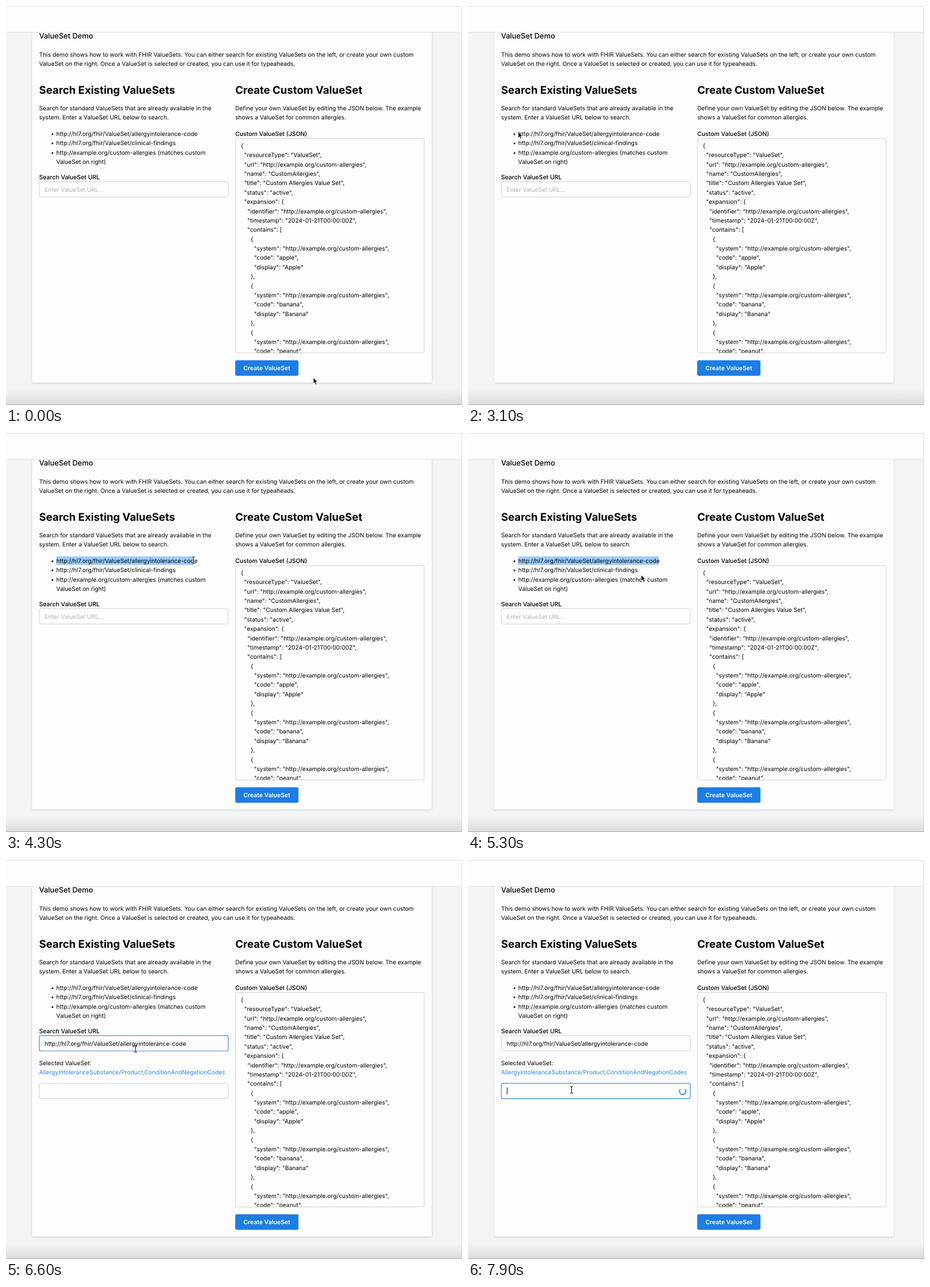
Animation, 799 px wide and 700 px high, one loop 8 s. Source, as an HTML page:

```html
<!DOCTYPE html>
<html lang="en">
<head>
<meta charset="utf-8">
<title>ValueSet Demo</title>
<style>
  html, body { margin: 0; width: 100%; height: 100%; overflow: hidden; background: #f2f4f6; }
  svg { display: block; }
  text { font: 10.3px Inter, sans-serif; fill: #000; text-rendering: geometricPrecision; }
  .title { font-size: 12.95px; font-weight: 500; }
  .heading { font-size: 18.7px; font-weight: 700; }
  .label { font-size: 10.56px; font-weight: 500; }
  .button { font-size: 10.56px; font-weight: 600; fill: #fff; text-anchor: middle; }
  .hint { fill: #adb3ba; }
  .link { fill: #2f86dc; }
  .field { fill: #fdfdfd; stroke: #cdd2d7; }
  .field.focused { stroke: #3a8fe6; stroke-width: 1.2; }
  .caret { stroke: #111; }
</style>
</head>
<body>
<svg id="stage" width="799" height="700" viewBox="0 0 799 700">
  <defs>
    <linearGradient id="fade" x2="0" y2="1">
      <stop offset="0" stop-color="#888" stop-opacity="0"/>
      <stop offset="1" stop-color="#888" stop-opacity=".22"/>
    </linearGradient>
    <filter id="shadow" x="-5%" y="-5%" width="110%" height="110%">
      <feDropShadow dx="0" dy="1" stdDeviation="1.6" flood-opacity=".2"/>
    </filter>
    <clipPath id="editor"><rect x="402" y="233" width="331" height="375.5"/></clipPath>
  </defs>
  <rect width="799" height="700" fill="#f2f4f6"/>
  <rect x="45.7" y="20" width="700.3" height="640.5" rx="3" fill="#fdfdfd" filter="url(#shadow)"/>
  <rect width="799" height="46" fill="#fdfdfd"/>
  <path d="M0 46.2H799" stroke="#dde0e3"/>
  <path d="M0 .5H799M798.5 0V700" stroke="#dcdddf"/>
  <rect y="672" width="799" height="27" fill="url(#fade)"/>
  <path d="M0 699.5H799" stroke="#adaeb0"/>

  <rect id="selection" x="88.3" y="216.5" height="15" fill="#9bcbfc"/>
  <rect id="search" class="field" x="58.3" y="308.2" width="331.1" height="26.8" rx="3"/>
  <rect class="field" x="402.2" y="232.6" width="330.6" height="376.1" rx="3"/>
  <rect x="401.6" y="621.5" width="110.9" height="27.2" rx="3" fill="#1c7de2"/>
  <g id="copy"></g>
  <g id="json" clip-path="url(#editor)"></g>

  <text id="hint" class="hint" x="67.8" y="325.5">Enter ValueSet URL...</text>
  <text id="query" x="67.8" y="325.5">http://hl7.org/fhir/ValueSet/allergyintolerance-code</text>
  <path id="searchCaret" class="caret" d="M68.5 315.5v13"/>

  <g id="result">
    <text x="58" y="359.6">Selected ValueSet:</text>
    <text class="link" x="58" y="375.8">AllergyIntoleranceSubstance/Product,ConditionAndNegationCodes</text>
    <rect id="codes" class="field" x="58.3" y="391.9" width="331.1" height="26.8" rx="3"/>
    <path id="codesCaret" class="caret" d="M68.5 399v12.5"/>
    <path id="spinner" d="M372 401.8A5.6 5.6 0 1 0 380 401.8" fill="none" stroke="#3088e0" stroke-width="1.7"/>
  </g>

  <path id="arrow" d="M0 0V10.6L2.4 8.4L4.1 12.2L6 11.4L4.3 7.7H7.6Z" fill="#000" stroke="#fff" stroke-width=".8"/>
  <g id="beam" fill="none">
    <path d="M-2.5-6Q0-6 0-4.5Q0-6 2.5-6M0-5V5M-2.5 6Q0 6 0 4.5Q0 6 2.5 6" stroke="#fff" stroke-width="2.4" opacity=".7"/>
    <path d="M-2.5-6Q0-6 0-4.5Q0-6 2.5-6M0-5V5M-2.5 6Q0 6 0 4.5Q0 6 2.5 6" stroke="#111" stroke-width="1.1"/>
  </g>
</svg>
<script>
const $ = id => document.getElementById(id);
const SVG = 'http://www.w3.org/2000/svg';

function addText(parent, x, y, content, className = '') {
  const node = document.createElementNS(SVG, 'text');
  node.setAttribute('x', x);
  node.setAttribute('y', y);
  node.setAttribute('class', className);
  node.textContent = content;
  parent.append(node);
}

[
  [58, 57.4, 'ValueSet Demo', 'title'],
  [58, 88.8, 'This demo shows how to work with FHIR ValueSets. You can either search for existing ValueSets on the left, or create your own custom'],
  [58, 105, 'ValueSet on the right. Once a ValueSet is selected or created, you can use it for typeaheads.'],
  [58, 154, 'Search Existing ValueSets', 'heading'],
  [401.7, 154, 'Create Custom ValueSet', 'heading'],
  [58, 183, 'Search for standard ValueSets that are already available in the'],
  [58, 199.3, 'system. Enter a ValueSet URL below to search.'],
  [401.7, 183, 'Define your own ValueSet by editing the JSON below. The example'],
  [401.7, 199.3, 'shows a ValueSet for common allergies.'],
  [78.5, 227.8, '•'],
  [78.5, 244.2, '•'],
  [78.5, 260.6, '•'],
  [88.1, 227.8, 'http://hl7.org/fhir/ValueSet/allergyintolerance-code'],
  [88.1, 244.2, 'http://hl7.org/fhir/ValueSet/clinical-findings'],
  [88.1, 260.6, 'http://example.org/custom-allergies (matches custom'],
  [88.1, 276.9, 'ValueSet on right)'],
  [58, 303.5, 'Search ValueSet URL', 'label'],
  [401.7, 227.8, 'Custom ValueSet (JSON)', 'label'],
  [457, 638.8, 'Create ValueSet', 'button'],
].forEach(row => addText($('copy'), ...row));

const system = 'http://example.org/custom-allergies';
const valueSet = {
  resourceType: 'ValueSet',
  url: system,
  name: 'CustomAllergies',
  title: 'Custom Allergies Value Set',
  status: 'active',
  expansion: {
    identifier: system,
    timestamp: '2024-01-21T00:00:00Z',
    contains: ['Apple', 'Banana', 'Peanut'].map(display =>
      ({ system, code: display.toLowerCase(), display })),
  },
};
JSON.stringify(valueSet, null, 2).split('\n').slice(0, 23).forEach((line, i) => {
  const content = line.trimStart();
  const indent = line.length - content.length;
  addText($('json'), 411.6 + indent * 2.85, 248.9 + i * 16.38, content);
});

// Pointer path: time, x, y
const pointerPath = [
  [0, 538.5, 652], [900, 538.5, 652], [1500, 361, 476.5], [1700, 361, 476.5],
  [2400, 142, 218], [2800, 88, 220.5], [3400, 88, 221], [4200, 328.5, 223],
  [5100, 328.5, 223], [5700, 232, 323], [6500, 232, 323], [7000, 183, 401],
  [7300, 183, 401], [7600, 181.5, 403], [8000, 181.5, 403],
];

function pointerAt(time) {
  const next = pointerPath.findIndex(([t]) => t > time);
  const [t0, x0, y0] = pointerPath[next - 1];
  const [t1, x1, y1] = pointerPath[next];
  const u = (time - t0) / (t1 - t0);
  const eased = u * u * (3 - 2 * u);
  return [x0 + (x1 - x0) * eased, y0 + (y1 - y0) * eased];
}

const show = (id, visible) => { $(id).style.display = visible ? '' : 'none'; };

function render(time) {
  const [x, y] = pointerAt(time);
  const dragging = time >= 3400 && time < 5200;
  const overInput = time >= 5600 && (y < 336 || y > 392);
  const isBeam = dragging || overInput;
  show('arrow', !isBeam);
  show('beam', isBeam);
  $(isBeam ? 'beam' : 'arrow').setAttribute('transform', `translate(${x} ${y})`);

  show('selection', time >= 3400 && time < 5800);
  $('selection').setAttribute('width', time < 4400 ? Math.max(0, x - 88.3) : 246);

  const pasted = time >= 6300;
  const searchFocused = time >= 5800 && time < 7500;
  const codesFocused = time >= 7500;
  $('search').classList.toggle('focused', searchFocused);
  $('codes').classList.toggle('focused', codesFocused);
  show('hint', !pasted);
  show('query', pasted);
  show('searchCaret', searchFocused && !pasted);
  show('result', time >= 6600);
  show('codesCaret', codesFocused);
  show('spinner', time >= 7900);
}

const start = performance.now();
function tick() {
  const elapsed = (performance.now() - start) % 8000;
  render(Math.floor(elapsed / 100) * 100);
  requestAnimationFrame(tick);
}
tick();
</script>
</body>
</html>
```
